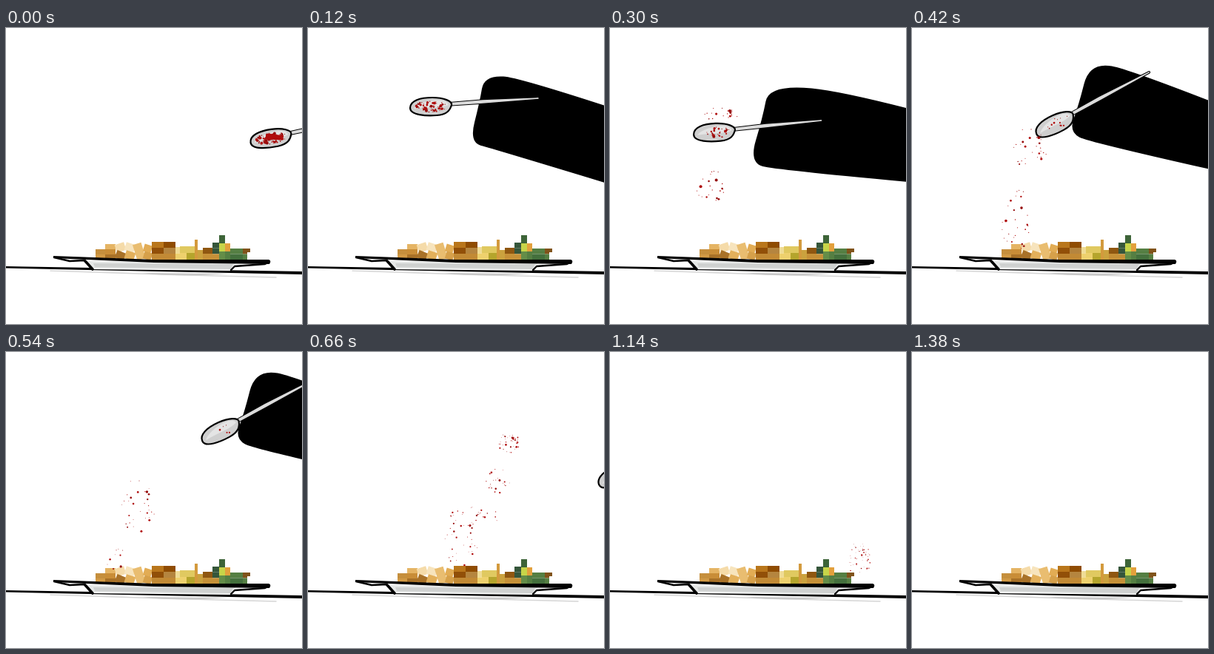
An HTML page with a canvas that plays this animation: 400x400 px, repeating every 1.44 s.

```html
<!DOCTYPE html>
<html>
<head>
<meta charset="utf-8">
<style>
html, body { margin: 0; width: 100%; height: 100%; overflow: hidden; background: #fff; }
canvas { display: block; }
</style>
</head>
<body>
<canvas id="stage" width="400" height="400"></canvas>
<script>
const ctx = document.getElementById('stage').getContext('2d');
const LOOP = 1440, STEP = 60;

// Repeatable noise in 0..1
const noise = n => {
  const v = Math.sin(n * 127.1 + 11.7) * 43758.5453;
  return v - Math.floor(v);
};
const mix = (a, b, k) => a.map((v, i) => v + (b[i] - v) * k);

function shape(d, fill, stroke, width) {
  const path = new Path2D(d);
  ctx.lineJoin = ctx.lineCap = 'round';
  if (fill) { ctx.fillStyle = fill; ctx.fill(path); }
  if (stroke) { ctx.strokeStyle = stroke; ctx.lineWidth = width; ctx.stroke(path); }
}

// Sleeve outline as control points relative to the spoon bowl
const REACH = [534, 99, 124, -39, 72, -42, 66, -6, 52, 49, 84, 57, 534, 194];
const SHAKE = [559, 50, 189, -54, 74, -65, 65, -19, 47, 41, 84, 51, 559, 94];
const LIFT = [507, 87, 107, -73, 47, -84, 32, -25, 19, 10, 47, 25, 507, 127];

// time, bowl x, bowl y, angle, grains on the spoon, sleeve
const HAND = [
  [0, 358, 149, -8, 110, ...REACH],
  [120, 166, 106, 0, 70, ...REACH],
  [300, 141, 141, -2, 26, ...SHAKE],
  [420, 193, 130, -24.5, 12, ...LIFT],
  [540, 290, 107, -24.5, 5, ...LIFT],
  [660, 418, 166, -24.5, 0, ...LIFT]
];

// birth, x, y, drift, fall speed, radius x, radius y, count
const CLOUDS = [
  [180, 134, 168, .1, .39, 20, 48, 30],
  [240, 148, 94, .33, .38, 24, 40, 32],
  [540, 217, 187, .37, .29, 36, 30, 34],
  [540, 251, 130, .4, .38, 16, 36, 28],
  [540, 269, 83, .19, .33, 15, 27, 55]
];

function grains(seed, x, y, rx, ry, count, size) {
  for (let i = 0; i < Math.round(count); i++) {
    const n = seed * 200 + i * 3;
    const angle = noise(n) * 2 * Math.PI, r = Math.sqrt(noise(n + 1));
    const gx = x + Math.cos(angle) * r * rx, gy = y + Math.sin(angle) * r * ry;
    if (gy > 298) continue;
    ctx.fillStyle = i % 3 ? '#b00d0d' : '#950909';
    ctx.beginPath();
    ctx.arc(gx, gy, size * (.5 + 1.4 * noise(n + 2) ** 3), 0, 7);
    ctx.fill();
  }
}

function cloud([birth, x, y, drift, fall, rx, ry, count], seed, t) {
  const age = t - birth;
  if (age <= 0) return;
  const grow = Math.min(1, age / 240);
  grains(seed, x + drift * age * age / 1000, y + fall * age, rx, ry * grow,
    count * (1 + grow) / 2, Math.max(.6, 1.35 - t / 1200));
}

function sleeve(x, y, flat) {
  const pts = [];
  for (let i = 0; i < flat.length; i += 2) pts.push([x + flat[i], y + flat[i + 1]]);
  const mid = i => mix(pts[i], pts[(i + 1) % pts.length], .5);
  ctx.beginPath();
  ctx.moveTo(...mid(pts.length - 1));
  pts.forEach((p, i) => ctx.quadraticCurveTo(...p, ...mid(i)));
  ctx.fillStyle = '#000';
  ctx.fill();
}

function hand(t) {
  const next = HAND.findIndex(k => k[0] > t);
  if (next < 0 && t > 660) return;
  const i = next < 0 ? HAND.length - 1 : next;
  const [a, b] = [HAND[i - 1], HAND[i]];
  const [, x, y, angle, count, ...arm] = mix(a, b, (t - a[0]) / (b[0] - a[0]));
  sleeve(x, y, arm);
  ctx.save();
  ctx.translate(x, y);
  ctx.rotate(angle * Math.PI / 180);
  const handle = 'M22-4L70-8L145-11L70-5L24-2Z';
  shape(handle, null, '#000', 3.6);
  shape(handle, '#dcdcdc', '#dcdcdc', 1.6);
  shape('M-28 2C-28-8-14-12 2-12S29-7 28-2C26 5 22 11 8 12S-28 12-28 2Z', '#cfcfcf', '#000', 2.2);
  shape('M-23 3C-18-6 20-15 24-2C14 3-2 0-23 3Z', '#e4e4e4');
  const full = count > 60;
  grains(9, full ? 0 : 4, 0, full ? 21 : 17, 7.5, count, 1.1);
  if (!t) shape('M-10 0L-3-7L18-1L13 4Z', '#b00d0d');
  ctx.restore();
}

// Columns of food: left edge, top, colours downwards
const FOOD = [
  [121, 299, '#c58f3d #d29a45'], [134, 292, '#e5b464 #c98d37 #a97228'],
  [148, 291, '#f5dba9 #a97228'], [161, 291, '#f7e4bd #e3b05b'],
  [174, 291, '#e9bd70'], [186, 293, '#e2ac54 #d6a04a'],
  [197, 289, '#b9761b #914f08 #c28a35'], [213, 289, '#8f4c02 #b5853f #c28a35'],
  [229, 296, '#f0dc96 #eed16d'], [235, 295, '#e0c960 #eed16d'], [244, 295, '#e0c960 #b5a52c'],
  [255, 286, '#d39a3d'], [259, 300, '#cba23e'], [266, 297, '#8f5711 #c69138'],
  [279, 290, '#35563b #35563b #c69138'], [288, 280, '#3d6438 #c7d549 #648d48'],
  [296, 291, '#e3a03c #557f43'], [303, 298, '#557f43 #44703d'], [320, 298, '#80531a #557f43'],
  [326, 298, '#80531a #fff #fff'], [330]
];

function food() {
  FOOD.slice(0, -1).forEach(([x, top, colours], i) => {
    const list = colours.split(' '), w = FOOD[i + 1][0] - x, h = (313 - top) / list.length;
    const slanted = x > 140 && x < 190;
    list.forEach((colour, row) => {
      ctx.save();
      ctx.translate(x + w / 2, top + h * (row + .5));
      if (slanted) ctx.rotate(i % 2 ? .3 : -.3 + row * .7);
      ctx.fillStyle = colour;
      ctx.fillRect(-w / 2, -h / 2, w, h);
      ctx.restore();
    });
  });
}

function table() {
  shape('M60 328L210 333L365 337', null, '#d5d5d5', 1.6);
  shape('M185 331Q225 337 300 332Z', '#c8c8c8');
  shape('M0 322L400 329V333L110 327L0 324.5Z', '#000');
  shape('M107 315L117 326L304 328L309 322L348 320L356 317Z', '#fff');
  shape('M110 315L310 318L303 327L118 325Z', '#e6e8e7');
  shape('M118 318L307 319L303 326L120 323Z', '#cfd1d0');
  shape('M65 310L86 315L106 314L117 326M304 327L309 322L350 319L356 316', null, '#000', 2.4);
  shape('M107 315L117 326', null, '#000', 3.6);
  shape('M64 308L200 313H355Q359 314 356 319L200 317L64 311Z', '#000');
}

function draw(t) {
  ctx.fillStyle = '#fff';
  ctx.fillRect(0, 0, 400, 400);
  hand(t);
  food();
  table();
  CLOUDS.forEach((c, i) => cloud(c, i + 1, t));
}

function tick() {
  draw(Math.floor(performance.now() % LOOP / STEP) * STEP);
  requestAnimationFrame(tick);
}
tick();
</script>
</body>
</html>
```
